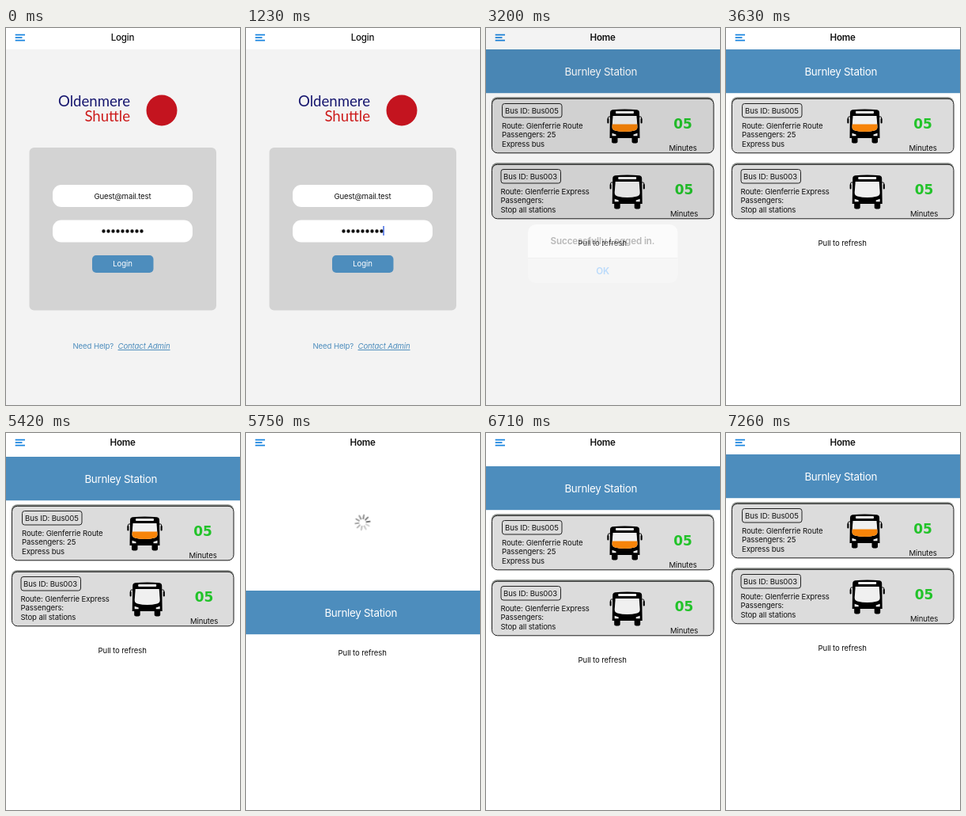
Animation, 296 px wide and 476 px high, one loop 8000 ms. Source, as an HTML page:

```html
<!DOCTYPE html>
<html lang="en">
<head>
<meta charset="utf-8">
<title>Bus tracker</title>
<style>
  html, body { margin: 0; width: 100%; height: 100%; overflow: hidden; background: #fff; }
  svg { display: block; width: 296px; height: 476px; }
  text { font: 9.6px Inter, Roboto, sans-serif; letter-spacing: -.12px; fill: #111; white-space: pre; }
  .mid { text-anchor: middle; }
  .title { font-size: 11.6px; font-weight: 600; letter-spacing: -.25px; }
  .station { font-size: 13.4px; letter-spacing: -.28px; fill: #fff; }
  .eta { font: bold 17px "DejaVu Sans", sans-serif; letter-spacing: 0; fill: #22c32a; }
  .brand { font: 18.6px Lato, "Open Sans", sans-serif; letter-spacing: 0; text-anchor: end; }
  .link { fill: #4d8dbd; }
  .menu { stroke: #1c86e0; stroke-width: 1.8; }

  /* Every timeline shares one 8 s loop with hard steps. */
  .login, .home, .loaded, .alert, .press, .caret, .data, .footer, .wheel {
    animation: 8s step-end infinite;
  }
  .login { animation-name: login; }
  .home { animation-name: home, pull; }
  .loaded { animation-name: loaded; }
  .alert { animation-name: alert; }
  .press { animation-name: press; }
  .caret { animation-name: caret; }
  .data { animation-name: data; }
  .footer { animation-name: footer; }
  .wheel { animation-name: wheel; }
  .list { transform: translateY(calc(var(--pull) * 1px)); }
  .wheel { transform: translate(147.5px, calc(27px + var(--pull) * .5px)); }
  .spin { animation: spin 1s steps(10) infinite; }

  @keyframes login { 0% { visibility: visible } 27%, to { visibility: hidden } }
  @keyframes home { 0% { opacity: 0 } 27%, to { opacity: 1 } }
  @keyframes loaded { 0% { opacity: 0 } 28.875%, to { opacity: 1 } }
  @keyframes alert {
    0% { opacity: 1 } 37.125% { opacity: .85 } 38.5% { opacity: .55 } 39.875% { opacity: .3 }
    41.25% { opacity: .12 } 42.625% { opacity: .04 } 45.375%, to { opacity: 0 }
  }
  @keyframes press { 0% { opacity: 0 } 34.375%, to { opacity: 1 } }
  @keyframes caret {
    0% { opacity: 0 } 1.625% { opacity: 1 } 8.75% { opacity: .5 } 10% { opacity: 0 }
    12.75% { opacity: .3 } 14% { opacity: .65 } 15.375% { opacity: 1 }
    22.875% { opacity: .5 } 25.125%, to { opacity: 0 }
  }
  /* The cards load behind the alert and reload during the pull. */
  @keyframes data {
    0% { opacity: 0 } 28.875% { opacity: 1 } 71.875% { opacity: 0 } 73.25%, to { opacity: 1 }
  }
  @keyframes footer {
    0% { transform: none } 28.875% { transform: translateY(166px) }
    71.875% { transform: none } 73.25%, to { transform: translateY(166px) }
  }
  /* Drag down, hold, then decay back to rest. */
  @keyframes pull {
    0% { --pull: 0 } 67.75% { --pull: 3 } 69.125% { --pull: 70 } 70.5% { --pull: 143 }
    71.875% { --pull: 172 } 76.25% { --pull: 120 } 77.875% { --pull: 80 } 79.25% { --pull: 53.6 }
    81% { --pull: 34 } 82.375% { --pull: 23 } 83.75% { --pull: 15 } 85.125% { --pull: 10 }
    86.5% { --pull: 6 } 88% { --pull: 3 } 89.375% { --pull: 1 } 90.75%, to { --pull: 0 }
  }
  @keyframes wheel {
    0% { opacity: 0 } 69.125% { opacity: .5 } 70.5% { opacity: 1 } 77.875% { opacity: .85 }
    79.25% { opacity: .7 } 81% { opacity: .4 } 82.375% { opacity: .2 } 83.75%, to { opacity: 0 }
  }
  @keyframes spin { from { transform: rotate(-170deg) } to { transform: rotate(190deg) } }
</style>
</head>
<body>
<svg viewBox="0 0 296 476">
  <defs>
    <path id="menu" class="menu" d="M11.7 8.700H24M11.7 12.200H20.500M11.7 15.700H24"/>
    <g id="card">
      <rect x="7" y="87.300" width="281" height="60" rx="7" fill="#858985"/>
      <rect x="7.500" y="89.300" width="280.500" height="68.500" rx="7" fill="#dcdcdc" stroke="#1a1a1a"/>
    </g>
    <rect id="badge" x="20.500" y="95.500" width="75.500" height="17.500" rx="3" fill="none" stroke="#222"/>
    <path id="glass" d="M160.500 111H190.500L191.500 125Q191.500 128.500 188 129.500Q175.500 132.500 163 129.500Q159.500 128.500 159.500 125Z"/>
    <g id="bus">
      <path d="M160 103.300Q175.500 101.700 191 103.300Q194 104 194 107L194.500 139H156.500L157 107Q157 104 160 103.300Z"/>
      <path d="M159 138H166.500V143.500Q166.500 145.500 162.700 145.500T159 143.500ZM184.500 138H192V143.500Q192 145.500 188.300 145.500T184.500 143.500Z"/>
      <path d="M157 112H155.500Q154.300 112 154.300 114V120M194 112H195.500Q196.700 112 196.700 114V120" fill="none" stroke="#000"/>
      <path d="M154.400 115V119.500M196.600 115V119.500" stroke="#000" stroke-width="2" stroke-linecap="round"/>
      <rect x="164" y="105" width="23" height="3" rx="1" fill="#eee"/>
      <use href="#glass" fill="#f0f0f0"/>
      <path d="M159.500 132.800L164.500 134.500V136.300H159.500ZM191.500 132.800L186.500 134.500V136.300H191.500Z" fill="#eee"/>
    </g>
    <clipPath id="load"><rect x="155" y="121.500" width="42" height="12"/></clipPath>
    <g id="wait">
      <text class="eta mid" x="249" y="127">05</text>
      <text class="mid" x="249" y="154.700">Minutes</text>
    </g>
  </defs>

  <g class="login">
    <rect width="296" height="476" fill="#f3f3f3"/>
    <rect width="296" height="27" fill="#fff"/>
    <use href="#menu"/>
    <text class="title mid" x="147.500" y="16.300" style="font-weight:500">Login</text>
    <text class="brand" x="157" y="99" style="fill:#17176f">Oldenmere</text>
    <text class="brand" x="157" y="118" style="fill:#cc1a1a">Shuttle</text>
    <circle cx="197" cy="104" r="19.500" fill="#c4141f"/>
    <rect x="29.500" y="151" width="236.500" height="205.500" rx="6" fill="#d3d3d3"/>
    <rect x="59" y="198" width="177" height="28" rx="11" fill="#fff"/>
    <rect x="59" y="242.500" width="177" height="28" rx="11" fill="#fff"/>
    <text class="mid" x="147.500" y="215.500">Guest@mail.test</text>
    <path d="M123.500 256.500H171.600" stroke="#111" stroke-width="4.400" stroke-linecap="round" stroke-dasharray="0 6"/>
    <rect class="caret" x="173.300" y="250" width="1.500" height="12" fill="#4169e1"/>
    <rect x="109" y="287" width="77.500" height="22" rx="5" fill="#4d8dbd"/>
    <text class="mid" x="147.500" y="301.300" style="fill:#fff">Login</text>
    <text class="link" x="84.500" y="405">Need Help?</text>
    <text class="link" x="141.500" y="405" text-decoration="underline" style="font-style:italic">Contact Admin</text>
  </g>

  <g class="home">
    <rect width="296" height="476" fill="#fff"/>
    <g class="wheel"><g class="spin" id="spin"></g></g>
    <g class="list">
      <rect y="27" width="296" height="55.200" fill="#4d8dbd"/>
      <text class="loaded station mid" x="145.300" y="60">Burnley Station</text>
      <g class="data">
        <use href="#card"/>
        <use href="#badge"/>
        <text x="24" y="107.800">Bus ID: Bus005</text>
        <text x="20" y="126.700">Route: Glenferrie Route</text>
        <text x="20" y="138.300">Passengers: 25</text>
        <text x="20" y="150">Express bus</text>
        <use href="#bus"/>
        <use href="#glass" fill="#f78409" clip-path="url(#load)"/>
        <use href="#wait"/>
        <g transform="translate(0 83)">
          <use href="#card"/>
          <use href="#badge" x="-1.500"/>
          <text x="22" y="107.800">Bus ID: Bus003</text>
          <text x="18.500" y="126.700">Route: Glenferrie Express</text>
          <text x="18.500" y="138.300">Passengers:</text>
          <text x="18.500" y="150">Stop all stations</text>
          <use href="#bus" x="3.200"/>
          <use href="#wait" x="1.500"/>
        </g>
      </g>
      <g class="footer"><text class="mid" x="147.200" y="108.600">Pull to refresh</text></g>
    </g>
    <rect width="296" height="27" fill="#fff"/>
    <g class="loaded"><use href="#menu"/></g>
    <text class="title mid" x="147.500" y="16.300">Home</text>
    <g class="alert">
      <rect width="296" height="476" fill="#000" opacity=".165"/>
      <rect x="53" y="248" width="189.500" height="73.500" rx="10" fill="#f0f0f0"/>
      <path class="press" d="M53 290.500H242.500V311.500Q242.500 321.500 232.500 321.500H63Q53 321.500 53 311.500Z" fill="#e0e0e0"/>
      <path d="M53 290.500H242.500" stroke="#cdcdcd"/>
      <text class="title mid" x="147.500" y="273" style="letter-spacing:-.1px">Successfully Logged in.</text>
      <text class="title mid" x="147.500" y="310.700" style="fill:#1b86f2">OK</text>
    </g>
  </g>
</svg>
<script>
  // Spinner blades fade behind the leading one.
  const spin = document.getElementById("spin");
  const blades = 10;
  for (let i = 0; i < blades; i++) {
    const blade = document.createElementNS("http://www.w3.org/2000/svg", "path");
    const attrs = {
      d: "M0 -5V-9.300", stroke: "#777", "stroke-width": 2, "stroke-linecap": "round",
      opacity: 1 - i * .075, transform: `rotate(${-360 / blades * i})`
    };
    for (const key in attrs) blade.setAttribute(key, attrs[key]);
    spin.append(blade);
  }
</script>
</body>
</html>
```
